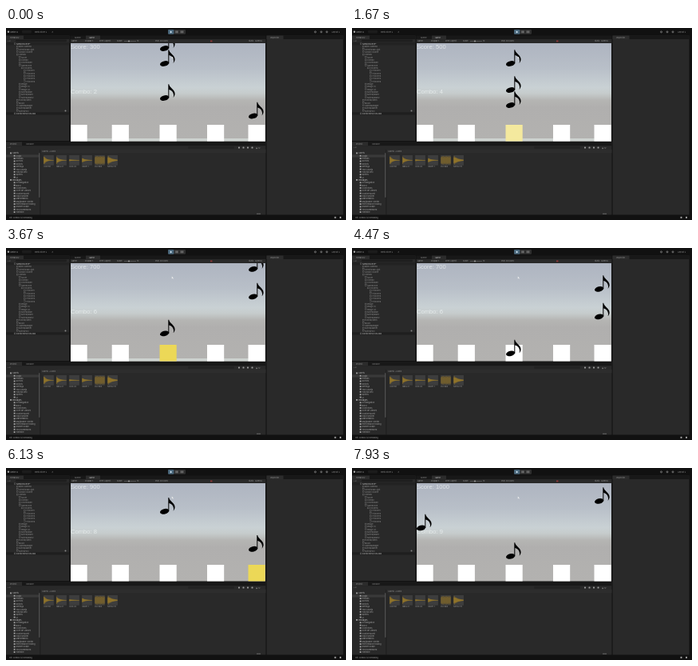
These frames come from a looping animation (426 px wide and 240 px high, 8000 ms). An HTML page:

```html
<!DOCTYPE html>
<html lang="en">
<head>
<meta charset="utf-8">
<title>Rhythm game in an editor</title>
<style>
html, body { margin: 0; width: 100%; height: 100%; overflow: hidden; background: #111; }
svg { display: block; width: 100vw; height: 100vh; }
text { font-family: Inter, "Liberation Sans", sans-serif; font-size: 2.5px; }
.hud { font-family: "Liberation Sans", Arial, sans-serif; font-size: 7.6px; fill: #f3f6f7; fill-opacity: .72; }
</style>
</head>
<body>
<svg id="stage" viewBox="0 0 426 240" preserveAspectRatio="none">
  <defs>
    <linearGradient id="sky" x1="0" y1="0" x2="0" y2="1">
      <stop offset="0" stop-color="#aeb4c0"/>
      <stop offset=".25" stop-color="#b8bfc8"/>
      <stop offset=".45" stop-color="#c9d1d4"/>
      <stop offset=".51" stop-color="#c6cccc"/>
      <stop offset=".58" stop-color="#b5b5b3"/>
      <stop offset=".65" stop-color="#b0afae"/>
      <stop offset="1" stop-color="#b3b2b0"/>
    </linearGradient>
    <clipPath id="view"><rect x="81" y="19" width="244" height="122.5"/></clipPath>
    <g id="note">
      <ellipse cx="-4.4" cy="0" rx="5.7" ry="3.2" transform="rotate(-14 -4.4 0)"/>
      <path d="M.3 0V-17.2H1.2C1.6-12.8 8.8-10.6 8.6-5.2C8.5-3.2 7.6-1.8 6.6-.6C8.2-5.2 5.4-9.4 1.3-10.4V0Z"/>
    </g>
  </defs>
  <g id="chrome"></g>
  <g clip-path="url(#view)">
    <rect x="81" y="19" width="244" height="123" fill="url(#sky)"/>
    <rect id="floor" x="81" y="138" width="244" height="4" fill="#cdd2cf"/>
    <g id="boxes"></g>
    <text id="score" class="hud" x="81" y="25.6"></text>
    <text id="combo" class="hud" x="81" y="82"></text>
    <g id="notes"></g>
    <path d="M207.8 35.6v2.8l.7-.6.9 1 .3-.3-.8-1h.9z" fill="#eee"/>
  </g>
</svg>
<script>
const NS = "http://www.w3.org/2000/svg";
const byId = id => document.getElementById(id);
const chrome = byId("chrome");

function add(parent, tag, attrs, content) {
  const el = document.createElementNS(NS, tag);
  for (const key in attrs) el.setAttribute(key, attrs[key]);
  if (content) el.textContent = content;
  parent.appendChild(el);
  return el;
}
const rect = (x, y, width, height, fill, rx = 0) =>
  add(chrome, "rect", { x, y, width, height, fill, rx });
const label = (x, y, str, fill = "#929292") =>
  add(chrome, "text", { x, y, fill }, str);
const path = (d, attrs) => add(chrome, "path", { d, ...attrs });

function drawPanels() {
  rect(0, 0, 426, 240, "#111");
  rect(0, 9.5, 79.5, 131.5, "#292929");
  rect(0, 9.5, 79.5, 4.5, "#181818");
  rect(0, 9.5, 22, 4.5, "#2c2c2c");
  rect(12, 14.6, 64, 2.7, "#1e1e1e", 1);
  rect(0, 18.2, 79.5, 3.2, "#222");
  rect(0, 105.3, 79.5, 3.2, "#1f1f1f");
  rect(80.5, 9.5, 245, 4.5, "#181818");
  rect(100, 9.5, 18, 4.5, "#2c2c2c");
  rect(80.5, 14, 245, 5, "#292929");
  rect(326.5, 9.5, 96, 224, "#292929");
  rect(326.5, 9.5, 96, 4.5, "#181818");
  rect(326.5, 9.5, 21, 4.5, "#2c2c2c");
  rect(0, 142.5, 325.5, 91, "#292929");
  rect(0, 142.5, 325.5, 4.7, "#181818");
  rect(0, 142.5, 20, 4.7, "#2c2c2c");
  rect(228, 148, 58, 3, "#232323", 1);
  rect(43, 152, 282.5, 4.2, "#2d2d2d");
  rect(42.6, 152, .6, 81.5, "#171717");
  rect(41, 156, 1.5, 56, "#4c4c4c", .7);
  rect(314, 231.8, 5, .8, "#777");
}

function drawBars() {
  add(chrome, "circle", { cx: 3, cy: 4.8, r: 1.2, fill: "#aaa" });
  label(5.5, 5.8, "Motor 6", "#aaa");
  rect(20, 3, 12, 3.5, "#1c1c1c", 1);
  label(36, 5.8, "Parts Store ▾");
  label(57, 5.8, "↺");
  rect(203, 2, 22, 5.8, "#303030", 1);
  rect(203, 2, 7.3, 5.8, "#486579", 1);
  path("M205.7 3.4v3l2.6-1.5z", { fill: "#d8edfa" });
  path("M213 3.5v2.8M214.8 3.5v2.8M219.5 3.5v2.8M221.5 3.5v2.8", { stroke: "#bbb", "stroke-width": .7 });
  for (const x of [387.5, 395, 402])
    add(chrome, "circle", { cx: x, cy: 4.9, r: 1, fill: "none", stroke: "#aaa", "stroke-width": .6 });
  label(408, 5.9, "Layout ▾");
  label(5, 12.8, "Hierarchy");
  label(2, 16.8, "+ ▾");
  label(86, 12.8, "Scene");
  label(104, 12.8, "Game", "#bbb");
  [[82, "Game"], [99, "Display 1"], [117, "Free Aspect"], [139, "Scale"], [164, "1x"],
   [187, "Play Focused"], [304, "Stats"], [312, "Gizmos"]].forEach(([x, s]) => label(x, 17.4, s));
  rect(148, 16.2, 15, .5, "#777");
  add(chrome, "circle", { cx: 154, cy: 16.4, r: .9, fill: "#aaa" });
  rect(256, 15.5, 2.5, 1.8, "#8b3434");
  label(331, 12.8, "Inspector");
  label(5, 145.9, "Project");
  label(25, 145.9, "Console");
  label(2, 150.4, "+ ▾");
  for (const x of [291, 296.5, 302, 307.5]) rect(x, 148.5, 2, 2, "#999", .5);
  label(313, 150.5, "◉ 12");
  label(4, 237.9, "Hit! Combo is increasing", "#999");
  for (const x of [411.5, 418]) rect(x, 235.7, 2, 2.3, "#999", .4);
}

// Leading dots set the indent of a row.
function drawTree(rows, { x, y, indent, fill, icon }) {
  rows.split("|").forEach((row, i) => {
    const depth = row.match(/^\.*/)[0].length;
    const left = x + depth * indent, base = y + i * 3.35;
    add(chrome, "rect", { x: left - 2.8, y: base - 1.9, width: 1.8, height: 1.8, ...icon });
    label(left, base, row.slice(depth), depth ? fill : "#c4c4c4");
  });
}

function drawClips() {
  label(45, 155.1, "Assets  ›  Audio");
  const clips = [["Correct", 5.5, 4], ["Bass 01", 4.5, 3.5], ["Kick 02", 1, 2],
    ["Snare 1", 2.8, 3], ["Full Mix", 5.2, 0], ["Menu Hit", 5.6, 2.2]];
  clips.forEach(([name, peak, decay], n) => {
    const x = 47.2 + n * 16, mid = 165.3;
    rect(x, 159, 12.7, 12.7, "#3d3d3d");
    let d = "";
    for (let i = 0; i < 24; i++) {
      const u = i / 23, wobble = .8 + .2 * Math.sin(i * 2.7 + n);
      const height = peak * Math.exp(-decay * u) * wobble + .2;
      d += `M${x + .4 + u * 11.8} ${mid - height}v${height * 2}`;
    }
    path(d, { stroke: decay ? "#b58c24" : "#8a6f2a", "stroke-width": .5 });
    label(x, 174.3, name);
  });
}

drawPanels();
drawBars();
drawTree("SampleScene*|.Main Camera|.Directional Light|.Global Volume|.Canvas|..Score|..Combo|..Countdown|..GameZone|...Columns|....HitZone1|....HitZone2|....HitZone3|....HitZone4|....HitZone5|..Image|..Image (1)|..Image (2)|..NoteSpawn|..NoteSpawn1|..NoteSpawn2|.EventSystem|.Music|.GameManager|.NoteSpawner|.NotesPool|DontDestroyOnLoad",
  { x: 13, y: 20.8, indent: 3.1, fill: "#909090", icon: { fill: "none", stroke: "#777", "stroke-width": .4 } });
add(chrome, "circle", { cx: 74.5, cy: 103.5, r: 1, fill: "#888" });
rect(0, 158.4, 41, 3.2, "#393939");
drawTree("Assets|.Audio|.Prefabs|.Scenes|.Scripts|.Settings|.Text Assets|.Tutorial Info|.Sprites|.UI|Packages|.AI Navigation|.Burst|.Collections|.Core RP Library|.Custom NUnit|.Input System|.Mathematics|.Multiplayer Center|.Performance testing|.Shader Graph|.Test Framework|.Timeline",
  { x: 8, y: 157.4, indent: 4.5, fill: "#a8a8a8", icon: { fill: "#a8a8a8" } });
drawClips();

const LOOP = 8000, STEP = 200 / 3, SPEED = .0312, SPAWN_Y = 24, FLASH = 420;
const FLOOR_GONE = 4400;
const BOX_X = [80.5, 132.7, 192.5, 252, 303.5];
const LANE_X = [91, 143, 203, 262, 314];

// lane, height of the note head at time zero, moment it is hit
const beats = [
  [4, 110, 600], [2, 87.5, 1450], [2, 44.5, 2900], [2, 25.5, 3600], [2, -7.5, 4500],
  [4, -53.5, 6000], [4, -88, 7070], [2, -135, 9000], [0, -170.5, 9900],
  [4, -204, 9900], [0, -222, 9900]
].map(([lane, y, hit]) => ({ lane, y, hit, el: add(byId("notes"), "use", { href: "#note" }) }));

const boxes = BOX_X.map(x =>
  add(byId("boxes"), "rect", { x, y: 121, width: 21.2, height: 21 }));

function render(time) {
  const t = Math.floor((time % LOOP + .5) / STEP) * STEP;
  const hits = beats.filter(b => b.hit <= t);
  byId("score").textContent = "Score: " + (300 + 100 * hits.length);
  byId("combo").textContent = "Combo: " + (2 + hits.length);
  byId("floor").style.display = t < FLOOR_GONE ? "" : "none";

  for (const b of beats) {
    const y = b.y + SPEED * t;
    b.el.setAttribute("transform", `translate(${LANE_X[b.lane]} ${y})`);
    b.el.style.display = y < SPAWN_Y || b.hit <= t ? "none" : "";
  }

  const last = hits[hits.length - 1];
  boxes.forEach((box, lane) => {
    const glow = last && last.lane === lane ? Math.max(0, 1 - (t - last.hit) / FLASH) : 0;
    box.setAttribute("fill", `rgb(${255 - 22 * glow},${255 - 46 * glow},${255 - 200 * glow})`);
  });
}

const start = performance.now();
function tick() {
  render(performance.now() - start);
  requestAnimationFrame(tick);
}
tick();
</script>
</body>
</html>
```
